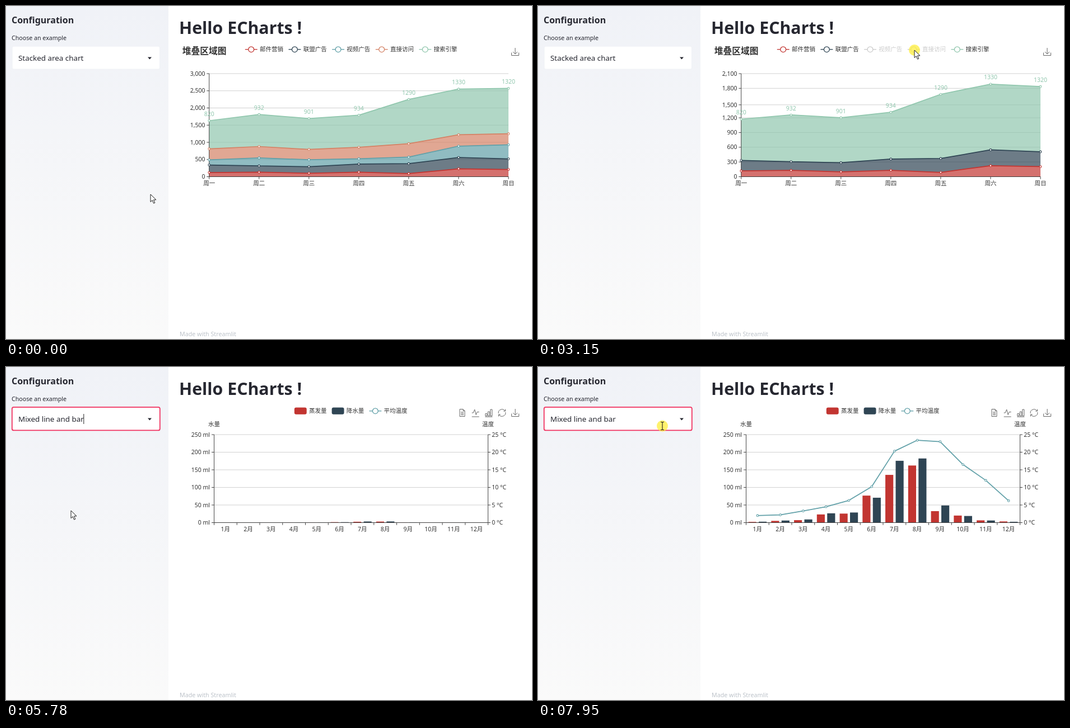
Recreate the animation shown at these times as an HTML page. Size 939 px wide and 596 px high, loop 8000 ms.

```html
<!DOCTYPE html>
<html lang="zh-CN">
<head>
<meta charset="utf-8">
<title>Hello ECharts</title>
<style>
html, body { margin: 0; width: 100%; height: 100%; overflow: hidden; background: #fff; }
body { position: relative; font-family: "Noto Sans", "Noto Sans CJK SC", "Noto Sans CJK", sans-serif; }
svg { position: absolute; left: 0; top: 0; width: 939px; height: 596px; }
svg text { font-size: 10.5px; white-space: pre; }
#side { position: absolute; left: 0; top: 0; width: 290px; height: 596px; background: linear-gradient(#f0f2f7, #fafafa); }
#list { position: absolute; left: 10px; top: 115px; width: 265px; background: #fff; border-radius: 3px; box-shadow: 0 3.5px 14px rgba(0,0,0,.16); font-size: 13.4px; color: #262730; }
#list div { height: 35px; line-height: 35px; padding-left: 12px; }
#list .on { background: #f0f2f6; }
#tip { position: absolute; left: 0; top: 0; padding: 4.4px; border-radius: 3.5px; background: rgba(50,50,50,.7); color: #fff; font-size: 12.25px; line-height: 18.375px; white-space: nowrap; }
#tip i { display: inline-block; width: 8.75px; height: 8.75px; border-radius: 50%; margin-right: 4.4px; }
</style>
</head>
<body>
<div id="side"></div>
<svg viewBox="0 0 939 596">
  <g fill="#262730">
    <text x="10" y="30.5" font-weight="700" style="font-size:16px">Configuration</text>
    <text x="10" y="60.5" style="font-size:10.65px">Choose an example</text>
    <text x="309" y="50" font-weight="700" style="font-size:30.3px">Hello ECharts !</text>
    <text x="310" y="591" fill="#bcc2c9" style="font-size:10.7px">Made with Streamlit</text>
    <rect id="box" x="10.8" y="71.8" width="264" height="41.6" rx="3" fill="#fff" stroke-width="1.75"/>
    <text id="choice" x="22" y="98" style="font-size:13.4px"></text>
    <path d="M253 91.5h7l-3.5 4z"/>
    <path id="caret" d="M138.8 84v18" stroke="#222" stroke-width="1"/>
  </g>
  <g id="chart"></g>
</svg>
<div id="tip"></div>
<div id="list"></div>
<svg viewBox="0 0 939 596">
  <circle id="click" r="10" fill="#fdee3c" opacity=".75"/>
  <path id="arrow" d="M0 0V13.6L3.2 10.7 5.6 16.2 7.8 15.2 5.5 9.9H10Z" fill="#fff" stroke="#1c1c1c"/>
  <path id="beam" d="M-3 -7H-1L0 -6 1 -7H3M0 -6V6M-3 7H-1L0 6 1 7H3" fill="none" stroke="#222" stroke-width="1.1"/>
</svg>
<script>
const $ = id => document.getElementById(id);
const LOOP = 8000, HIDE_A = 2240, HIDE_B = 3010, OPEN = 4400, PICK = 5420, SWAP = 5765;
const clicks = [[2210, 2480], [2980, 3240], [4230, 4450], [5350, 5580], [7900, 8000]];
const palette = ['#c23531', '#2f4554', '#61a0a8', '#d48265', '#91c7ae'];

const area = {
  x0: 362.7, x1: 897, y0: 305.5, y1: 121, dark: '#6a7985',
  cats: [...'一二三四五六日'].map(d => '周' + d),
  names: ['邮件营销', '联盟广告', '视频广告', '直接访问', '搜索引擎'],
  data: [
    [120, 132, 101, 134, 90, 230, 210],
    [220, 182, 191, 234, 290, 330, 310],
    [150, 232, 201, 154, 190, 330, 410],
    [320, 332, 301, 334, 390, 330, 320],
    [820, 932, 901, 934, 1290, 1330, 1320]
  ]
};
const mixed = {
  x0: 371.5, x1: 860.5, y0: 278.5, y1: 121, dark: '#333',
  cats: Array.from({length: 12}, (_, i) => i + 1 + '月'),
  names: ['蒸发量', '降水量', '平均温度'],
  data: [
    [2, 4.9, 7, 23.2, 25.6, 76.7, 135.6, 162.2, 32.6, 20, 6.4, 3.3],
    [2.6, 5.9, 9, 26.4, 28.7, 70.7, 175.6, 182.2, 48.7, 18.8, 6, 2.3],
    [2, 2.2, 3.3, 4.5, 6.3, 10.2, 20.3, 23.4, 23, 16.5, 12, 6.2]
  ]
};
const stages = [
  {from: -1e4, max: 3000, step: 500, off: []},
  {from: HIDE_A, max: 2500, step: 500, off: [2]},
  {from: HIDE_B, max: 2100, step: 300, off: [2, 3]}
];
const options = ['Basic bar chart', 'Basic line chart', 'Basic area chart', 'Stacked area chart',
  'Mixed line and bar', 'Custom pie chart', 'Effect scatter chart', 'Calendar heatmap',
  'Basic treemap', 'Basic radar chart', 'Gauge chart', 'Graph network', 'Candlestick chart'];

// pointer path: time, x, y
const path = [
  [0, 258, 337], [250, 258, 337], [420, 230, 322], [700, 330, 262], [1040, 498, 208.5], [1080, 498, 208.5],
  [1160, 506, 208.44], [1200, 514, 208], [1450, 567, 222], [1860, 604, 165], [1900, 604, 165], [2090, 595, 72],
  [2780, 595, 72], [2960, 672, 79], [3710, 672, 79], [3960, 470, 78], [4190, 198, 84], [4610, 198, 84],
  [5060, 116, 257], [5800, 116, 257], [6140, 165, 262], [6170, 165, 262], [6480, 440, 256], [6640, 533, 230.374],
  [6680, 543, 224], [6960, 690, 185], [7000, 690, 185], [7250, 760, 170], [7520, 560, 190], [7790, 278, 146],
  [7820, 274, 142], [7920, 222, 105.5], [8000, 222, 105.5]
];

const lerp = (a, b, p) => a + (b - a) * p;
const clamp = v => Math.max(0, Math.min(1, v));
const cubicOut = p => 1 - (1 - clamp(p)) ** 3;

function slope(i, d) {
  const a = path[i - 1], b = path[i], c = path[i + 1];
  if (!a || !c || a[d] === b[d] || b[d] === c[d]) return 0;
  return (c[d] - a[d]) / (c[0] - a[0]);
}
function pointer(t) {
  t = Math.max(0, t);
  let i = 0;
  while (i < path.length - 2 && path[i + 1][0] <= t) i++;
  const a = path[i], b = path[i + 1], h = b[0] - a[0], s = clamp((t - a[0]) / h);
  return [1, 2].map(d =>
    a[d] * (1 + 2 * s) * (1 - s) ** 2 + slope(i, d) * h * s * (1 - s) ** 2 +
    b[d] * s * s * (3 - 2 * s) + slope(i + 1, d) * h * s * s * (s - 1));
}

const text = (x, y, s, fill = '#333', anchor = 'start', extra = '') =>
  `<text x="${x}" y="${y}" fill="${fill}" text-anchor="${anchor}" ${extra}>${s}</text>`;
const line = (d, stroke, w = .9, extra = '') =>
  `<path d="${d}" fill="none" stroke="${stroke}" stroke-width="${w}" ${extra}/>`;
const rect = (x, y, w, h, fill, extra = '') =>
  `<rect x="${x}" y="${y}" width="${w}" height="${h}" fill="${fill}" ${extra}/>`;
const dot = (x, y, color, big) =>
  `<circle cx="${x}" cy="${y}" r="${big ? 4.5 : 1.8}" fill="#fff" stroke="${color}" stroke-width="${big ? .9 : 1.1}"/>`;
const poly = pts => 'M' + pts.map(p => p[0].toFixed(2) + ' ' + p[1].toFixed(2)).join('L');
const lineKey = (x, y, c) => line(`M${x} ${y}h21.9`, c, 1.3) +
  `<circle cx="${x + 10.9}" cy="${y}" r="4.9" fill="#fff" stroke="${c}" stroke-width="1.3"/>`;

const icons = {
  save: 'M0-7V4M-4 0L0 4 4 0M-6.5 1.5V6.5H6.5V1.5',
  doc: 'M-4.5-6.5H1.5L4.5-3.5V6.5H-4.5ZM1.5-6.5V-3.5H4.5M-2.5-1H2.5M-2.5 1.3H2.5M-2.5 3.6H2.5',
  line: 'M-6.5 0H-4L-1.5-6 1 3.5 3-1.5H6.5M-6.5 7H6.5',
  bar: 'M-6 1.5h3v4h-3zM-1.5-2h3v7.5h-3zM3-6h3v11.5h-3zM-6.5 7.2H6.5',
  redo: 'M-6.3 1A6.4 6.4 0 0 1 5.5-3.2M6.3-1A6.4 6.4 0 0 1-5.5 3.2M6-6.5V-3H2.7M-6 6.5V3H-2.7'
};
const icon = (name, x) => line(icons[name], '#666', 1, `transform="translate(${x} 82)"`);

const inside = (c, [x, y]) => x >= c.x0 && x <= c.x1 && y >= c.y1 && y <= c.y0;
function nearest(c, x) {
  const f = (x - c.x0) / (c.x1 - c.x0);
  return c === area ? Math.round(f * 6) : Math.min(11, Math.floor(f * 12));
}
const money = v => v.toFixed(2).replace(/\B(?=(\d{3})+\.)/g, ',');

function tag(x, y, s, fill, side) {
  const w = s.length * 5.9 - (/[.]/.test(s) ? 3 : 0) - (/,/.test(s) ? 3 : 0) + (side ? 12.25 : 16.5);
  let left = side < 0 ? x - w : side > 0 ? x : x - w / 2;
  if (left < 310) left = 310;
  return rect(left, y - 9.5, w, 19, fill) + text(left + w / 2, y + 3.8, s, '#fff', 'middle');
}
const crossLine = (c, y) => line(`M${c.x0} ${y}H${c.x1}`, '#888', .9, 'stroke-dasharray="3.5 2.6"');

function drawArea(t, at, hot) {
  const c = area, k = stages.findLastIndex(s => t >= s.from);
  const now = stages[k], old = stages[Math.max(0, k - 1)], p = k ? cubicOut((t - now.from) / 300) : 1;
  const scale = (st, v) => c.y0 - v / st.max * (c.y0 - c.y1);
  const xs = c.cats.map((_, i) => lerp(c.x0, c.x1, i / 6));
  const sum = (st, s, i) => c.data.reduce((a, d, n) => a + (n <= s && !st.off.includes(n) ? d[i] : 0), 0);
  const names = c.names, shown = names.map((_, s) => s).filter(s => !now.off.includes(s));
  const active = at ? nearest(c, at[0]) : -1;
  let grid = '', axis = '', fills = '', lines = '', dots = '', labels = '', base = xs.map(x => [x, c.y0]);

  for (let v = 0; v <= now.max; v += now.step) {
    const kept = v <= old.max && v % old.step === 0;
    const y = kept ? lerp(scale(old, v), scale(now, v), p) : scale(now, v);
    grid += line(`M${c.x0} ${y}H${c.x1}`, '#ccc');
    axis += line(`M${c.x0 - 4.4} ${y}H${c.x0}`, '#333') + text(355.6, y + 3.7, v.toLocaleString('en-US'), '#333', 'end');
  }
  xs.forEach((x, i) => {
    axis += line(`M${x} ${c.y0}v4.4`, '#333') + text(x, 321, c.cats[i], '#333', 'middle');
  });
  axis += line(`M${c.x0} ${c.y1}V${c.y0}H${c.x1}`, '#333');

  for (const s of shown) {
    const col = palette[s];
    const pts = xs.map((x, i) => [x, lerp(scale(old, sum(old, s, i)), scale(now, sum(now, s, i)), p)]);
    fills += `<path d="${poly([...pts, ...base.reverse()])}Z" fill="${col}" opacity=".7"/>`;
    lines += line(poly(pts), col, 1.75, 'stroke-linejoin="bevel"');
    pts.forEach(([x, y], i) => {
      dots += dot(x, y, col, i === active || hot === s);
      if (s === 4) labels += text(x, y - 8.3, c.data[4][i], col, 'middle');
    });
    base = pts.slice();
  }
  let out = text(314.8, 86.2, '堆叠区域图', '#333', 'start', 'font-weight="700" style="font-size:15.75px"');
  names.forEach((n, s) => {
    const x = 426.8 + s * 77.65, off = now.off.includes(s);
    out += lineKey(x, 77.7, off ? '#ccc' : palette[s]) + text(x + 26.2, 81.4, n, off ? '#ccc' : '#333');
  });
  out += icon('save', 909) + grid + fills + axis + lines;
  if (at) out += line(`M${xs[active]} ${c.y1}V${c.y0}`, '#999') + crossLine(c, at[1]);
  out += dots + labels;
  if (at) out += tag(363.7, at[1], money((c.y0 - at[1]) / (c.y0 - c.y1) * now.max), c.dark, -1) +
    tag(xs[active], 318, c.cats[active], c.dark, 0);
  return out;
}

function drawMixed(t, at) {
  const c = mixed, p = cubicOut((t - SWAP - 10) / 1000), band = (c.x1 - c.x0) / 12, h = c.y0 - c.y1;
  const active = at ? nearest(c, at[0]) : -1;
  let out = '';
  [514.8, 581.6].forEach((x, s) => {
    out += rect(x, 72.5, 21.9, 12.25, palette[s], 'rx="3"') + text(x + 26.2, 82.3, c.names[s]);
  });
  out += lineKey(648.4, 78.7, palette[2]) + text(674.6, 82.3, c.names[2]);
  ['doc', 'line', 'bar', 'redo', 'save'].forEach((n, i) => out += icon(n, 814.5 + i * 23.65));
  out += text(c.x0, 106, '水量', '#333', 'middle') + text(c.x1, 106, '温度', '#333', 'middle');
  for (let i = 0; i <= 5; i++) {
    const y = c.y0 - h * i / 5;
    out += line(`M${c.x0} ${y}H${c.x1}`, '#ccc') + line(`M${c.x0 - 4.4} ${y}h4.4M${c.x1} ${y}h4.4`, '#333') +
      text(364, y + 3.7, i * 50 + ' ml', '#333', 'end') + text(867.3, y + 3.7, i * 5 + ' °C');
  }
  const pts = c.data[2].map((v, i) => [c.x0 + band * (i + .5), c.y0 - v / 25 * h]);
  c.cats.forEach((n, i) => {
    const x = c.x0 + band * i;
    for (const s of [0, 1]) {
      const bar = c.data[s][i] / 250 * h * p;
      out += rect(x + band * .1 + s * 18.43, c.y0 - bar, 14.17, bar, palette[s]);
    }
    out += text(x + band / 2, 294, n, '#333', 'middle');
  });
  for (let i = 0; i <= 12; i++) out += line(`M${c.x0 + band * i} ${c.y0}v4.4`, '#333');
  out += line(`M${c.x0} ${c.y1}V${c.y0}H${c.x1}V${c.y1}`, '#333');
  out += `<clipPath id="wipe">${rect(c.x0, 100, (c.x1 - c.x0) * p, 200, '#000')}</clipPath><g clip-path="url(#wipe)">` +
    line(poly(pts), palette[2], 1.75, 'stroke-linejoin="bevel"') +
    pts.map(([x, y], i) => dot(x, y, palette[2], i === active)).join('') + '</g>';
  if (at) {
    const f = (c.y0 - at[1]) / h;
    out += rect(c.x0 + band * active, c.y1, band, h, 'rgba(150,150,150,.3)') + crossLine(c, at[1]) +
      tag(c.x0 - 2.8, at[1], money(f * 250), c.dark, -1) + tag(c.x1 + 2.6, at[1], money(f * 25), c.dark, 1) +
      tag(pts[active][0], 290.5, c.cats[active], c.dark, 0);
  }
  return out;
}

// the tooltip trails the pointer: a weighted mean of its recent goals
function drawTip(c, t) {
  let u = t;
  while (u > t - 100 && !inside(c, pointer(u))) u -= 20;
  const here = pointer(u), on = inside(c, here);
  $('tip').style.display = on ? 'block' : 'none';
  if (!on) return;
  const i = nearest(c, here[0]), off = c === area ? stages.findLast(s => t >= s.from).off : [];
  const rows = c.names.map((_, s) => s).filter(s => !off.includes(s));
  $('tip').innerHTML = c.cats[i] + rows.map(s =>
    `<br><i style="background:${palette[s]}"></i>${c.names[s]}: ${c.data[s][i]}`).join('');
  const w = c === area ? 98 : 95, h = (rows.length + 1) * 18.375 + 8.8;
  let x = 0, y = 0, total = 0;
  for (let k = 0; k < 10; k++) {
    const q = pointer(u - k * 20);
    if (!inside(c, q)) break;
    const g = .75 ** k;
    x += g * (q[0] + 17.5 + w > 921 ? q[0] - 17.5 - w : q[0] + 17.5);
    y += g * (q[1] + 17.5 + h > 328 ? q[1] - 17.5 - h : q[1] + 17.5);
    total += g;
  }
  $('tip').style.transform = `translate(${x / total}px, ${y / total}px)`;
}

function show(id, on) { $(id).style.display = on ? '' : 'none'; }

function render(t) {
  const [x, y] = pointer(t), c = t < SWAP ? area : mixed, lag = pointer(t - 40);
  const at = inside(c, lag) ? lag : null;
  const item = (x - 426.8) / 77.65, hot = y > 70 && y < 85 && item > 0 && item % 1 < .9 ? Math.floor(item) : -1;
  $('chart').innerHTML = c === area ? drawArea(t, at, hot) : drawMixed(t, at);
  drawTip(c, t - 40);

  $('box').setAttribute('stroke', t < OPEN ? '#f1f3f7' : '#f0315f');
  $('choice').textContent = t < PICK ? options[3] : options[4];
  show('caret', t >= PICK && t < 7900 && (t - 4670) % 1060 < 530);
  const open = t >= OPEN && t < PICK;
  show('list', open);
  if (open) {
    const row = y < 115 ? 3 : Math.floor((y - 115) / 35);
    [...$('list').children].forEach((el, i) => el.className = i === row ? 'on' : '');
  }
  const beam = x > 10 && x < 250 && y > 72 && y < 113;
  show('beam', beam);
  show('arrow', !beam);
  show('click', clicks.some(([a, b]) => t >= a && t < b));
  for (const id of ['beam', 'arrow', 'click']) $(id).setAttribute('transform', `translate(${x} ${y})`);
}

$('list').innerHTML = options.map(o => `<div>${o}</div>`).join('');
const start = performance.now();
function tick() {
  render((performance.now() - start) % LOOP);
  requestAnimationFrame(tick);
}
tick();
</script>
</body>
</html>
```
